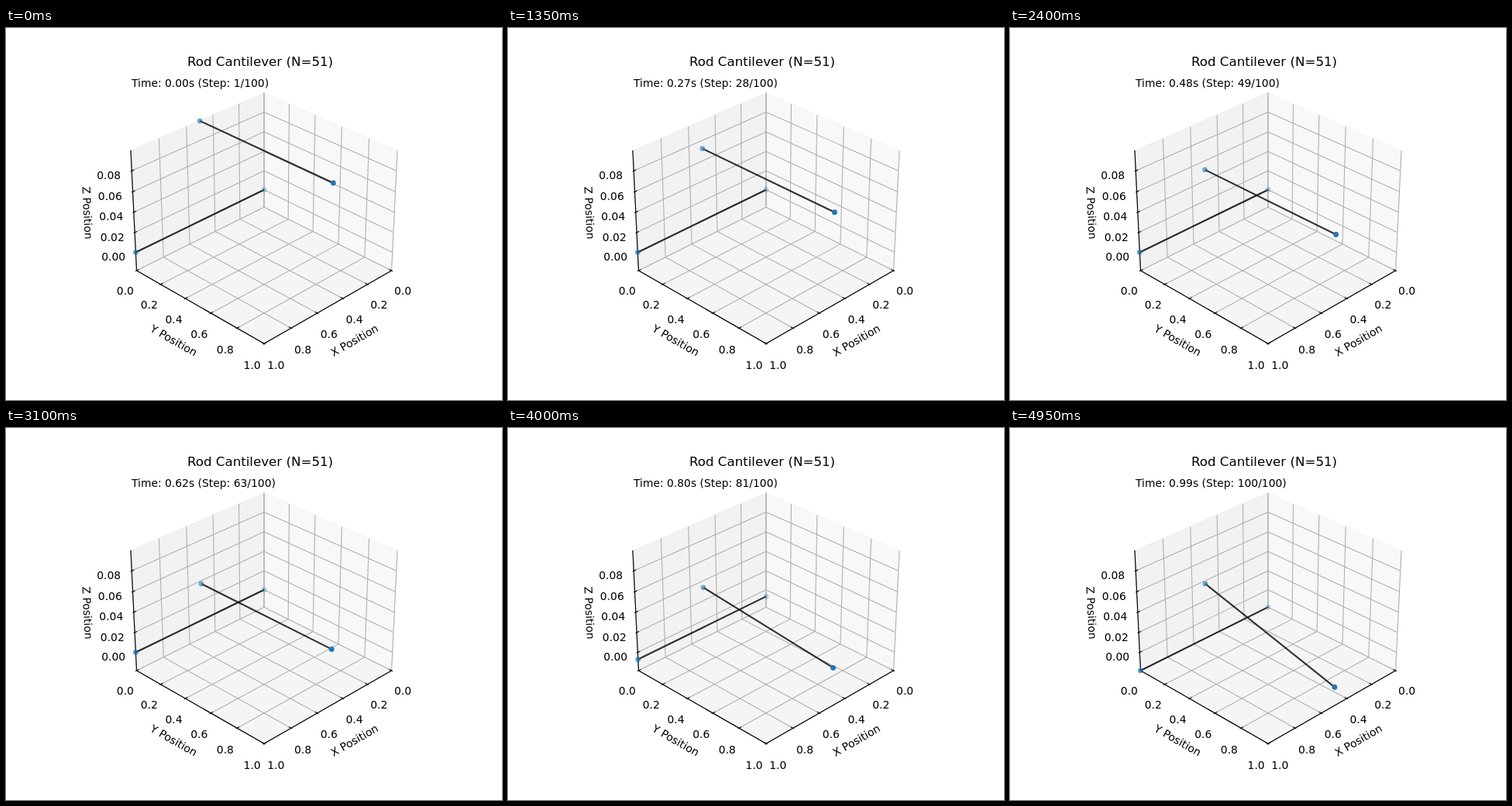
These frames come from a looping animation (640x480 px, 5 s). An HTML page:

```html
<!DOCTYPE html>
<html lang="en">
<head>
<meta charset="utf-8">
<title>Rod Cantilever</title>
<style>
  html, body { margin: 0; width: 100%; height: 100%; overflow: hidden; background: #fff; }
  svg { display: block; width: 640px; height: 480px; }
  text { font: 13.89px "DejaVu Sans", sans-serif; fill: #000; white-space: pre; }
  .title { font-size: 16.67px; }
  .mid { text-anchor: middle; }
  .pane { fill-opacity: .5; stroke-opacity: .5; stroke-width: 1.39; stroke-linejoin: round; }
  .grid { fill: none; stroke: #b0b0b0; stroke-width: 1.11; stroke-linejoin: round; }
  .axis { stroke: #000; stroke-width: 1.11; stroke-linecap: square; }
  .tick { stroke: #000; stroke-width: 1.11; }
  .rod { stroke: #000; stroke-opacity: .8; stroke-width: 2.08; }
  .node { fill: #1f77b4; }
</style>
</head>
<body>
<svg id="plot" viewBox="0 0 640 480" xmlns="http://www.w3.org/2000/svg">
  <text class="title mid" x="328" y="49">Rod Cantilever (N=51)</text>
</svg>
<script>
const STEP_MS = 50, STEPS = 100;
const HIT = 68.13;                       // step at which the rods touch
const SPEED = 0.001;                     // fall per step
const Z_MAX = 0.099, Z_MIN = -0.6 * SPEED * (STEPS - 1 - HIT);
const SIDE = 1.19048, HEIGHT = 0.89286;  // plot box in view units
const DIST = 10, SCALE = 1997.84, CX = 333, CY = 237.4;
const COS = Math.sqrt(3) / 2, SIN = 0.5; // elevation of 30 degrees

const plot = document.getElementById('plot');

function add(tag, attrs, text) {
  const el = document.createElementNS('http://www.w3.org/2000/svg', tag);
  set(el, attrs);
  if (text !== undefined) el.textContent = text;
  return plot.appendChild(el);
}

function set(el, attrs) {
  for (const key in attrs) el.setAttribute(key, attrs[key]);
}

// Perspective view of a point in box fractions (0 to 1 on each axis)
function project(x, y, f) {
  const u = (x - 0.5) * SIDE, v = (y - 0.5) * SIDE, s = (f - 0.5) * HEIGHT;
  const near = (u + v) / Math.SQRT2, right = (v - u) / Math.SQRT2;
  const depth = DIST - near * COS - s * SIN;
  return {
    x: CX + SCALE * right / depth,
    y: CY - SCALE * (s * COS - near * SIN) / depth,
    depth
  };
}

const frac = z => (z - Z_MIN) / (Z_MAX - Z_MIN);
const path = pts => pts.map(p => project(...p)).map(p => p.x.toFixed(2) + ',' + p.y.toFixed(2)).join(' ');
const ends = (a, b) => ({ x1: a.x, y1: a.y, x2: b.x, y2: b.y });
const line = (cls, a, b) => add('line', { class: cls, ...ends(project(...a), project(...b)) });

function drawBox() {
  const pane = (color, pts) => add('polygon', { class: 'pane', fill: color, stroke: color, points: path(pts) });
  pane('#f2f2f2', [[0, 0, 0], [0, 1, 0], [0, 1, 1], [0, 0, 1]]);
  pane('#e6e6e6', [[0, 0, 0], [1, 0, 0], [1, 0, 1], [0, 0, 1]]);
  pane('#ececec', [[0, 0, 0], [1, 0, 0], [1, 1, 0], [0, 1, 0]]);
}

function drawAxes() {
  const sixths = [0, 0.2, 0.4, 0.6, 0.8, 1], heights = [0, 0.02, 0.04, 0.06, 0.08];
  const out = 0.0864, tickOut = 1 + 0.1 / 12, tickIn = 1 - 0.2 / 12;
  const grid = pts => add('polyline', { class: 'grid', points: path(pts) });
  const label = (pos, text) => {
    const p = project(...pos);
    add('text', { class: 'mid', x: p.x, y: Math.round(p.y + 10.7) }, text);
  };

  for (const t of sixths) grid([[t, 1, 0], [t, 0, 0], [t, 0, 1]]);
  for (const t of sixths) grid([[1, t, 0], [0, t, 0], [0, t, 1]]);
  for (const z of heights) grid([[1, 0, frac(z)], [0, 0, frac(z)], [0, 1, frac(z)]]);

  line('axis', [0, 1, 0], [1, 1, 0]);
  line('axis', [1, 0, 0], [1, 1, 0]);
  line('axis', [1, 0, 0], [1, 0, 1]);

  for (const t of sixths) {
    line('tick', [t, tickOut, 0], [t, tickIn, 0]);
    line('tick', [tickOut, t, 0], [tickIn, t, 0]);
    label([t, 1 + out, -out], t.toFixed(1));
    label([1 + out, t, -out], t.toFixed(1));
  }
  for (const z of heights) {
    const f = frac(z);
    line('tick', [tickOut, 0, f], [tickIn, 0, f]);
    label([1 + out, -out, f], z.toFixed(2));
  }

  const name = (text, x, y, turn) =>
    add('text', { class: 'mid', y: 5, transform: `translate(${x} ${y}) rotate(${turn})` }, text);
  name('X Position', 449.5, 403, -29.8);
  name('Y Position', 216.5, 403, 29.8);
  name('Z Position', 105.2, 238.5, 87.2);
}

drawBox();
drawAxes();
const clock = add('text', { x: 162, y: 76 });
const rods = [0, 1].map(() => add('line', { class: 'rod' }));
const nodes = [0, 1, 2, 3].map(() => add('circle', { class: 'node', r: 3.4 }));

function draw(step) {
  const after = Math.max(0, step - HIT) * SPEED;
  const fall = Z_MAX - step * SPEED;
  const low = frac(-0.6 * after);
  const pts = [
    project(0, 0, low),
    project(1, 0, low),
    project(0.5, 0, frac(fall + 1.2 * after)),
    project(0.5, 1, frac(fall))
  ];
  rods.forEach((rod, i) => set(rod, ends(pts[2 * i], pts[2 * i + 1])));

  // Farther nodes fade, down to 30 %
  const inv = pts.map(p => 1 / p.depth);
  const far = Math.min(...inv), span = Math.max(...inv) - far;
  nodes.forEach((node, i) => set(node, {
    cx: pts[i].x, cy: pts[i].y, 'fill-opacity': 0.3 + 0.7 * (inv[i] - far) / span
  }));
  clock.textContent = `Time: ${(step / STEPS).toFixed(2)}s (Step: ${step + 1}/${STEPS})`;
}

let shown = -1;
function tick() {
  const step = Math.floor(performance.now() / STEP_MS) % STEPS;
  if (step !== shown) draw(shown = step);
  requestAnimationFrame(tick);
}
tick();
</script>
</body>
</html>
```
